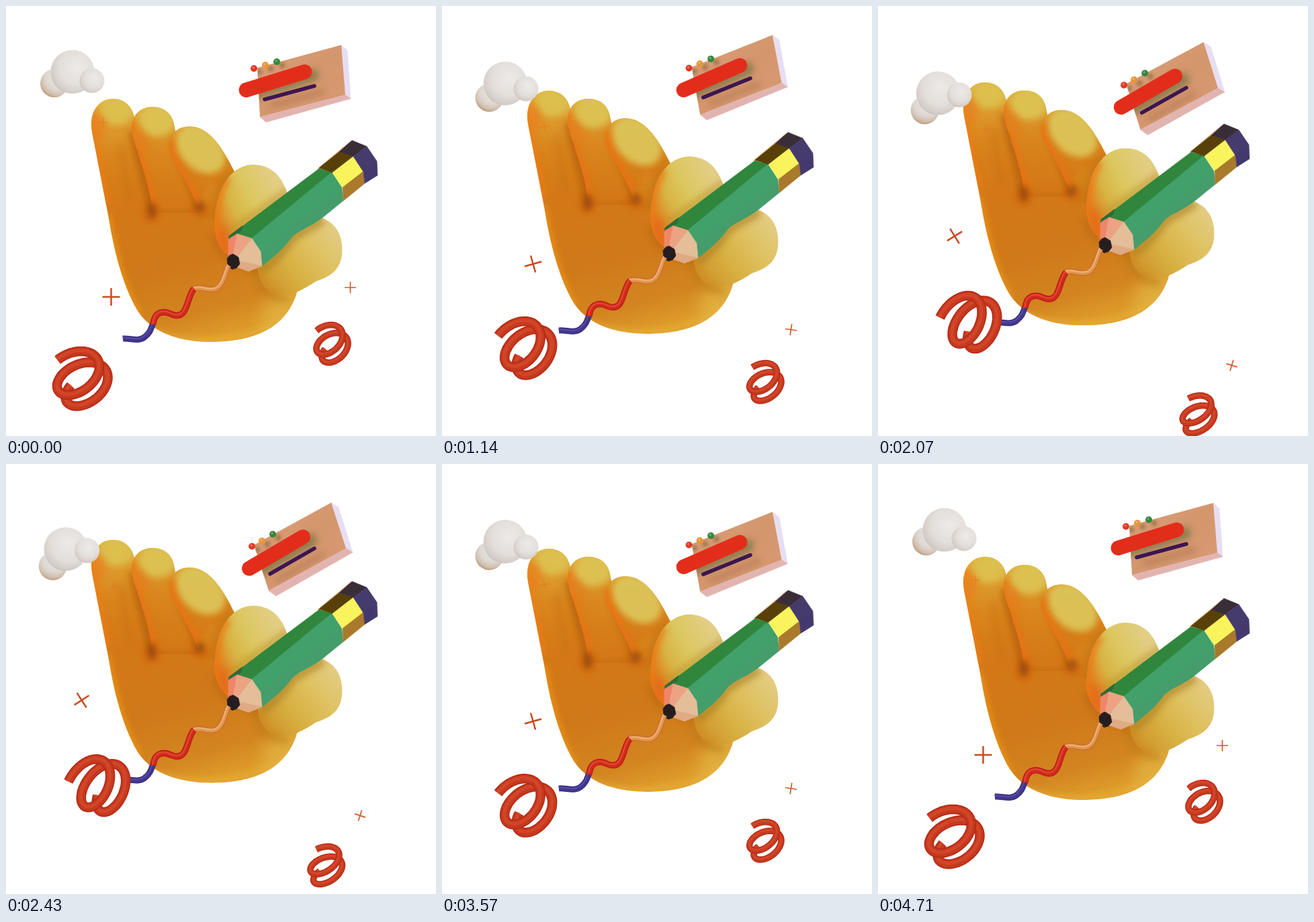
An HTML page that plays this animation: 640 px wide and 640 px high, repeating every 4780 ms.

```html
<!DOCTYPE html>
<html lang="en">
<head>
<meta charset="utf-8">
<title>Drawing hand</title>
<style>
html, body { margin: 0; width: 100%; height: 100%; overflow: hidden; background: #fff; }
svg { display: block; width: 100vw; height: 100vh; }
</style>
</head>
<body>
<svg id="stage" viewBox="0 0 640 640" fill="none">
  <defs>
    <filter id="b2" x="-50%" y="-50%" width="200%" height="200%"><feGaussianBlur stdDeviation="2"/></filter>
    <filter id="b5" x="-100%" y="-100%" width="300%" height="300%"><feGaussianBlur stdDeviation="5"/></filter>
    <filter id="b12" x="-100%" y="-100%" width="300%" height="300%"><feGaussianBlur stdDeviation="12"/></filter>
    <linearGradient id="finger" gradientUnits="userSpaceOnUse" x1="0" y1="140" x2="0" y2="320">
      <stop stop-color="#dfb443"/><stop offset=".2" stop-color="#dd9c2e"/>
      <stop offset=".45" stop-color="#d9861d"/><stop offset=".65" stop-color="#d67e19"/>
      <stop offset=".88" stop-color="#d47817"/><stop offset="1" stop-color="#d47817" stop-opacity="0"/>
    </linearGradient>
    <linearGradient id="palm" gradientUnits="userSpaceOnUse" x1="230" y1="290" x2="290" y2="500">
      <stop stop-color="#d47817"/><stop offset=".45" stop-color="#cf791a"/>
      <stop offset=".8" stop-color="#d38420"/><stop offset="1" stop-color="#de9c2a"/>
    </linearGradient>
    <linearGradient id="knuckle" gradientUnits="userSpaceOnUse" x1="312" y1="320" x2="405" y2="275">
      <stop stop-color="#e07a1c"/><stop offset=".3" stop-color="#d8b444"/>
      <stop offset=".6" stop-color="#dcc760"/><stop offset="1" stop-color="#e2cd82"/>
    </linearGradient>
    <linearGradient id="thumb" gradientUnits="userSpaceOnUse" x1="385" y1="415" x2="490" y2="335">
      <stop stop-color="#cf942a"/><stop offset=".35" stop-color="#d8b042"/>
      <stop offset=".7" stop-color="#dfc262"/><stop offset="1" stop-color="#e3cb80"/>
    </linearGradient>
    <linearGradient id="face" x1="0" y1="0" x2="1" y2="1">
      <stop stop-color="#dc9f7c"/><stop offset=".5" stop-color="#d4966c"/><stop offset="1" stop-color="#d99a74"/>
    </linearGradient>
    <radialGradient id="puff" cx=".6" cy=".4" r=".68">
      <stop stop-color="#edeae7"/><stop offset=".6" stop-color="#e3deda"/>
      <stop offset=".88" stop-color="#d3cbc6"/><stop offset="1" stop-color="#c2b6ae"/>
    </radialGradient>
    <radialGradient id="puff2" cx=".65" cy=".3" r=".75">
      <stop stop-color="#ebe7e4"/><stop offset=".6" stop-color="#ded7d1"/>
      <stop offset=".85" stop-color="#d0beac"/><stop offset="1" stop-color="#bb9a7c"/>
    </radialGradient>
  </defs>
  <g id="hand"></g>
  <g id="card"></g>
  <g id="cloud">
    <circle cx="-27" cy="17" r="21" fill="url(#puff2)"/>
    <circle r="32.5" fill="url(#puff)"/>
    <circle cx="29" cy="13" r="18.5" fill="url(#puff)"/>
  </g>
  <g id="props"></g>
</svg>
<script>
const $ = id => document.getElementById(id);
const LOOP = 4780, STEPS = 67;

function add(parent, tag, attrs) {
  const el = document.createElementNS('http://www.w3.org/2000/svg', tag);
  for (const k in attrs) el.setAttribute(k, attrs[k]);
  parent.appendChild(el);
  return el;
}
const poly = (parent, points, fill) =>
  add(parent, 'polygon', { points, fill, stroke: fill, 'stroke-width': .6, 'stroke-linejoin': 'round' });
const line = (parent, d, stroke, width, extra) =>
  add(parent, 'path', { d, stroke, 'stroke-width': width, ...extra });
const glow = (blur, opacity) => ({ filter: `url(#${blur})`, opacity });
const mix = (a, b, s) => a + (b - a) * s;

// A clipped body part; returns the group that takes its soft shading.
let clips = 0;
function part(d, fill) {
  const id = 'clip' + clips++;
  add(add(hand, 'clipPath', { id }), 'path', { d });
  const g = add(hand, 'g', { 'clip-path': `url(#${id})` });
  add(g, 'path', { d, fill });
  return g;
}
const spot = (g, cx, cy, rx, ry, fill, blur, opacity = 1, turn = 0) =>
  add(g, 'ellipse', { cx, cy, rx, ry, fill, ...glow(blur, opacity), transform: `rotate(${turn} ${cx} ${cy})` });

const hand = $('hand');

function buildHand() {
  let g = part('M150 296C157 350 171 412 196 454C216 485 255 500 305 500C360 500 413 485 432 430L446 370L340 312L330 290Z', 'url(#palm)');
  spot(g, 412, 452, 24, 46, '#e0b040', 'b12', .9, 30);
  line(g, 'M215 482C260 506 365 508 425 455', '#eab23c', 9, glow('b5', .65));
  line(g, 'M149 298C157 350 171 412 198 460', '#f29a17', 9, glow('b5', .75));
  line(g, 'M372 395C378 425 395 436 420 436', '#b87b18', 12, glow('b5', .5));
  line(g, 'M312 340C320 372 340 380 376 392', '#b8660f', 16, glow('b5', .5));

  add(hand, 'path', { d: 'M188 190L250 205L292 308L216 308Z', fill: '#b9660f' });

  g = part('M153 320L149 296L128 188C123 160 136 138 159 138C180 138 191 154 192 172C197 215 220 262 222 320Z', 'url(#finger)');
  spot(g, 165, 156, 25, 21, '#dcc050', 'b5', .95);
  line(g, 'M150 298L128 188C126 178 127 164 131 154', '#f07c14', 10, glow('b5', .85));
  spot(g, 138, 180, 9, 20, '#ec7a1a', 'b5', .6);
  line(g, 'M190 185C195 220 210 258 217 302', '#b5600c', 15, glow('b5', .8));
  line(g, 'M172 205C174 240 182 270 185 290', '#c06a10', 10, glow('b5', .3));

  g = part('M219 320C217 278 206 250 196 217C190 202 187 192 187 181C187 162 200 150 218 150C237 150 249 162 251 180C257 215 291 256 292 320Z', 'url(#finger)');
  spot(g, 225, 170, 28, 24, '#dcc252', 'b5', .95);
  line(g, 'M219 305C216 275 204 246 196 217C189 200 186 190 188 170', '#ee6f12', 10, glow('b5', .85));
  spot(g, 203, 200, 8, 22, '#e67a1a', 'b5', .6, -20);
  line(g, 'M252 200C260 228 281 262 288 302', '#b5620c', 16, glow('b5', .8));

  g = part('M290 318C284 288 268 262 256 241C248 229 243 220 243 209C243 190 256 179 273 179C303 179 323 212 340 246L332 318Z', 'url(#finger)');
  spot(g, 290, 213, 42, 30, '#dcc458', 'b5', .95, 45);
  line(g, 'M289 305C284 288 268 262 256 241C246 227 240 212 245 198', '#ee6f12', 11, glow('b5', .9));
  line(g, 'M314 266C304 282 296 294 292 306', '#d8861e', 22, glow('b5', .7));
  line(g, 'M338 250C314 270 310 305 312 325', '#c07614', 14, glow('b5', .6));
  spot(hand, 216, 308, 13, 14, '#d0600f', 'b5', .6);
  spot(hand, 289, 304, 15, 10, '#d0600f', 'b5', .5);
  spot(hand, 217, 304, 5, 12, '#83400a', 'b5', .85);
  spot(hand, 289, 299, 6, 8, '#83400a', 'b5', .8);

  g = part('M343 377C318 368 307 344 311 312C315 264 339 236 368 236C394 236 411 252 420 282L420 320Z', 'url(#knuckle)');
  line(g, 'M342 376C316 366 307 344 311 312C313 290 321 268 330 256', '#ec7c18', 12, glow('b5', .9));
  line(g, 'M335 336L420 274', '#b98e28', 10, glow('b5', .55));
  spot(g, 324, 350, 9, 22, '#e5661b', 'b5', .6);

  g = part('M470 315C494 324 503 346 500 371C497 394 482 403 461 410C443 422 427 431 408 430C388 428 375 410 375 388L410 340Z', 'url(#thumb)');
  line(g, 'M376 392C395 386 415 362 425 345L472 318', '#a97c20', 14, glow('b5', .6));
  line(g, 'M375 385C375 412 388 430 408 430', '#d08a20', 12, glow('b5', .7));
  line(g, 'M461 410C482 403 497 394 500 371', '#e2c060', 6, glow('b5', .5));
}

function buildPencil() {
  const g = add(hand, 'g', {});
  poly(g, '464,242 512,202 500,216 468,243', '#dca274');
  poly(g, '333,342 466,242 487,248 366,346 344,339', '#30863d');
  poly(g, '332,342 352,327 350,335 344,339 331,348', '#2b6b3a');
  add(g, 'path', { fill: '#42a06b', d: 'M485 247L500 270L502 290L470 316C446 333 434 334 424 346C413 362 398 374 381 387L378 364L365 346Z' });
  add(g, 'path', { fill: '#459b6c', opacity: .55, d: 'M500 270L502 290L470 316C446 333 434 334 424 346C413 362 398 374 381 387L379 365Z' });
  poly(g, '466,241 496,217 517,224 486,248', '#584008');
  poly(g, '517,224 532,246 501,270 486,248', '#faf45c');
  poly(g, '532,246 534,264 502,290 501,270', '#a97a2c');
  poly(g, '496,217 515,200 537,209 517,224', '#392d38');
  poly(g, '537,209 552,231 532,247 517,224', '#453b6c');
  poly(g, '552,231 553,252 534,264 532,246', '#43396f');

  poly(g, '331,347 344,339 340,372 331,375', '#ee866a');
  poly(g, '344,339 366,346 346,374 338,371', '#eba384');
  poly(g, '366,346 379,365 381,387 347,380 345,373', '#e3be98');
  poly(g, '381,387 361,395 344,389 346,379', '#dfaa84');
  poly(g, '329,376 333,371 338,369 346,374 348,384 343,390 337,392 330,388', '#251d20');

  const tube = (d, dark, mid, light, w) => {
    line(g, d, dark, w);
    line(g, d, mid, w * .68);
    line(g, d, light, w * .22, { transform: 'translate(-.8 -1.4)', opacity: .7 });
  };
  tube('M174 495C185 494 196 500 206 493C215 486 216 480 219 472', '#38307f', '#43368f', '#6354a8', 9);
  tube('M279 421C290 416 300 425 312 421C323 416 325 400 331 386', '#cf6a35', '#e0964f', '#efc283', 8.5);
  tube('M219 474C221 454 235 453 247 459C272 469 268 432 280 421', '#bd2018', '#d22a1c', '#e8573d', 9.5);
}

// Slanted helix between two poses; each pose holds the centre, radii, drift per turn, spin and lean.
const POSE = ['x', 'y', 'rx', 'ry', 'dx', 'dy', 'spin', 'lean'];
function helix(p, from, to) {
  let d = '';
  for (let a = from; a <= to; a += 6) {
    const deg = a + p.spin, r = deg * Math.PI / 180;
    const x = p.x + p.dx * (deg / 360 - 1) + p.rx * Math.cos(r);
    const y = p.y + p.dy * (deg / 360 - .75) + p.ry * Math.sin(r + p.lean);
    d += (d ? 'L' : 'M') + x.toFixed(1) + ' ' + y.toFixed(1);
  }
  return d;
}
function coil(width, rest, end) {
  const g = add($('props'), 'g', {});
  const round = { 'stroke-linejoin': 'round' };
  const turns = [[570, 936], [228, 576]].map(([a, b]) => ({
    a, b, strokes: [
      line(g, '', '#b32c16', width, round),
      line(g, '', '#c6391f', width * .76, round),
      line(g, '', '#d64a2d', width * .35, { ...round, transform: 'translate(-.5 -1.2)', opacity: .75 })
    ]
  }));
  return (x, y, s) => {
    place(g, x, y);
    const p = {};
    POSE.forEach((k, i) => p[k] = mix(rest[i], end[i], s));
    for (const t of turns) {
      const d = helix(p, t.a, t.b);
      t.strokes.forEach(el => el.setAttribute('d', d));
    }
  };
}
const cross = (r, width, color, opacity = 1) =>
  line($('props'), `M${-r} 0H${r}M0 ${-r}V${r}`, color, width, { opacity });

buildHand();
buildPencil();

const card = $('card');
add(add(card, 'clipPath', { id: 'faceClip' }), 'polygon', { id: 'faceHole' });
const sheet = {
  side: poly(card, '', '#e7def2'),
  base: poly(card, '', '#e2b4b0'),
  face: poly(card, '', 'url(#face)')
};
sheet.face.setAttribute('stroke', 'none');
const shade = add(card, 'g', { 'clip-path': 'url(#faceClip)' });
const capped = { 'stroke-linecap': 'round' };
const pillShade = line(shade, '', '#857a4c', 20, { ...capped, ...glow('b5', .85) });
const ruleShade = line(shade, '', '#a9704c', 7, { ...capped, ...glow('b5', .6) });
const dotShades = [0, 1, 2].map(() => add(shade, 'circle', { r: 4.5, fill: '#8a6c3c', ...glow('b2', .65) }));
const rule = line(card, '', '#3d1552', 5.5, capped);
const dots = ['#e23a24', '#e8963a', '#35883c'].map(fill => add(card, 'circle', { r: 5, fill }));
const glints = dots.map(() => add(card, 'circle', { r: 1.5, fill: '#fff', opacity: .35 }));
const pill = line(card, '', '#e32d1b', 22, capped);

const tinyCross = cross(7, 1, '#e8701c', .75);
const leftCross = cross(13, 2.5, '#cb4a22');
const rightCross = cross(8.5, 1.7, '#cf5a2a');
const bigCoil = coil(14.5, [-9.6, -12.6, 34.6, 28.4, 12.5, 16.4, 0, -.38], [-7.7, -8, 27.2, 34.2, 23, 7, -24, -.45]);
const smallCoil = coil(9.6, [-6, -9, 21.5, 19, 8, 12, 0, -.38], [-3.7, -11.2, 22.6, 16.7, 4.5, 15, 16, -.44]);

// Smooth curve through [step, value] pairs.
function curve(pts, n) {
  let i = 0;
  while (i < pts.length - 2 && n > pts[i + 1][0]) i++;
  const slope = j => j > 0 && j < pts.length - 1
    ? (pts[j + 1][1] - pts[j - 1][1]) / (pts[j + 1][0] - pts[j - 1][0]) : 0;
  const [x0, y0] = pts[i], [x1, y1] = pts[i + 1];
  const h = x1 - x0, t = (n - x0) / h, t2 = t * t, t3 = t2 * t;
  return y0 * (2 * t3 - 3 * t2 + 1) + y1 * (3 * t2 - 2 * t3)
    + h * (slope(i) * (t3 - 2 * t2 + t) + slope(i + 1) * (t3 - t2));
}
const drift = [[0, 0], [8, .145], [16, .5], [24, .855], [28, .935], [33.5, .827], [38, .94], [42, .89], [50, .51], [58, .145], [66, 0]];
const cardY = [[0, 111], [8, 114], [16, 106.5], [24, 122], [33, 131], [42, 139], [50, 134.5], [56, 118], [60, 108.5], [66, 111]];

function place(el, x, y, turn = 0) {
  el.setAttribute('transform', `translate(${x.toFixed(2)} ${y.toFixed(2)}) rotate(${turn.toFixed(2)})`);
}

function drawCard(s, y) {
  const at = (x0, y0, x1, y1) => [mix(x0, x1, s), mix(y0, y1, s) + y];
  const tl = at(374, -19, 369, -11.5), tr = at(499, -53, 484, -74.5);
  const br = at(505, 21, 506, -6.5), bl = at(378, 54, 391, 56.5);
  const tr2 = at(508, -45, 495, -67.5), br2 = at(513, 27, 516, -.5), bl2 = at(387, 62, 402, 64.5);
  const set = (el, ...p) => el.setAttribute('points', p.join(' '));
  set(sheet.side, tr, tr2, br2, br);
  set(sheet.base, bl, br, br2, bl2);
  set(sheet.face, tl, tr, br, bl);
  set($('faceHole'), tl, tr, br, bl);
  const seg = (el, a, b, dx = 0, dy = 0) =>
    el.setAttribute('d', `M${a[0] + dx} ${a[1] + dy}L${b[0] + dx} ${b[1] + dy}`);
  const p0 = at(357.5, 14, 362, 23.5), p1 = at(444.5, -13, 442, -23.5);
  const r0 = at(385, 28, 393, 31.5), r1 = at(459, 8, 459, -6.5);
  seg(pill, p0, p1);
  seg(pillShade, p0, p1, 11, 5);
  seg(rule, r0, r1);
  seg(ruleShade, r0, r1, 12, 9);
  [at(369, -18, 366, -9.5), at(386, -23, 381, -17.5), at(403, -28, 397, -27.5)].forEach(([x, cy], i) => {
    const move = (el, dx, dy) => { el.setAttribute('cx', x + dx); el.setAttribute('cy', cy + dy); };
    move(dots[i], 0, 0);
    move(glints[i], -1, -1.5);
    move(dotShades[i], 8, 5);
  });
}

function render(ms) {
  const n = Math.floor((ms % LOOP + 3) * STEPS / LOOP) % STEPS;
  const s = (1 - Math.cos(2 * Math.PI * n / (STEPS - 1))) / 2;
  const v = curve(drift, n);
  place(hand, 0, -25.4 * s);
  place($('cloud'), 99 - 10 * s, 98 + 34.5 * v, -20.5 * s);
  bigCoil(114 + 21.5 * s, 554 - 88 * v, s);
  smallCoil(485.5 - 8.5 * s, 502 + 113.5 * v, s);
  place(leftCross, 156.5 - 44 * s, 433 - 98 * v, -33 * s);
  place(rightCross, 512.5 + 14.5 * s, 419 + 125.5 * v, 18 * s);
  place(tinyCross, 145 + 16 * s, 173 + 12.5 * v, -25 * s);
  drawCard(s, curve(cardY, n));
}

function tick() {
  render(performance.now());
  requestAnimationFrame(tick);
}
tick();
</script>
</body>
</html>
```
